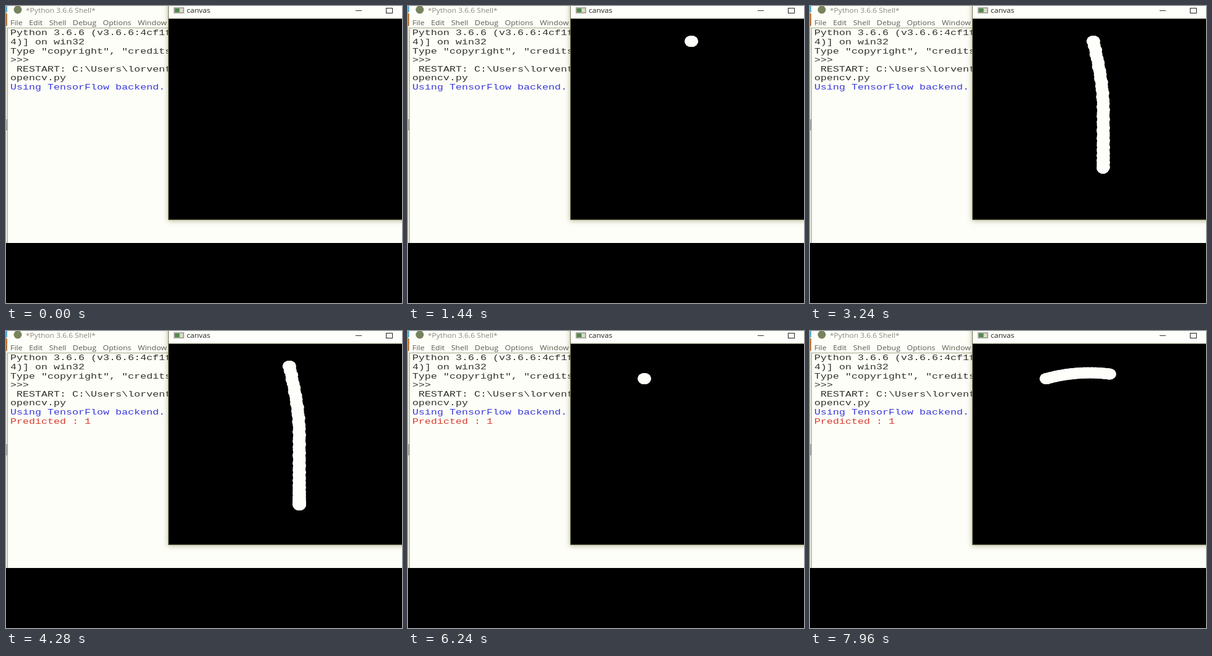
An HTML page with a canvas for the animation above (8000 ms loop, 640 by 480 pixels).

```html
<!DOCTYPE html>
<html lang="en">
<head>
<meta charset="utf-8">
<title>Digit drawing</title>
<style>
html, body { margin: 0; width: 100%; height: 100%; overflow: hidden; background: #000; }
canvas { display: block; }
</style>
</head>
<body>
<canvas id="stage" width="640" height="480"></canvas>
<script>
const ctx = document.getElementById('stage').getContext('2d');
const LOOP = 8000, STEP = 40, PREDICTED_AT = 4040;
const PAPER = '#fefef8';
const MONO = '13.33px "Liberation Mono", monospace';
const UI = '10.4px "Open Sans", sans-serif';
const TITLE = '10px "Open Sans", sans-serif';

// A stroke rests from `show`, moves from `start` to `end`, and vanishes at `clear`.
// `pen` maps progress 0..1 to a position.
const strokes = [
  { show: 1280, start: 1480, end: 3960, clear: 4640, pen(k) {
    const p = 1 - (1 - k) ** 2;
    return [458 + 16 * Math.sin(Math.min(1, 2 * p) * Math.PI / 2), 57 + 224 * p];
  } },
  { show: 6120, start: 6280, end: 7960, clear: LOOP, pen(k) {
    return [382 + 103 * k, 67.5 + 9.5 * (1 - k / 0.68) ** 2];
  } }
];

const menu = ['File', 'Edit', 'Shell', 'Debug', 'Options', 'Window'];
const shell = [
  'Python 3.6.6 (v3.6.6:4cf1f54eb7',
  '4)] on win32',
  'Type "copyright", "credits"',
  '>>>',
  ' RESTART: C:\\Users\\lorvent',
  'opencv.py',
  'Using TensorFlow backend.'
];

function rect(color, x, y, w, h) {
  ctx.fillStyle = color;
  ctx.fillRect(x, y, w, h);
}

// Returns the drawn width.
function text(str, x, y, font, color, aspect = 1.2) {
  ctx.save();
  ctx.translate(x, y);
  ctx.scale(aspect, 1);
  ctx.font = font;
  ctx.fillStyle = color;
  ctx.fillText(str, 0, 0);
  const width = ctx.measureText(str).width * aspect;
  ctx.restore();
  return width;
}

const shellLine = (str, row, color) =>
  text(str, 7, 47.4 + row * 14.6, MONO, color, 1.25);

function drawShell(t) {
  rect(PAPER, 0, 0, 640, 383);
  rect('#e8e8d8', 0, 0, 2, 383);
  rect('#59a9cf', 0, 0, 2, 10);
  rect('#b97836', 0, 12, 2, 20);
  rect('#a9a9a0', 0, 183, 2, 18);
  rect('#a6a688', 2, 35, 1, 348);
  rect('#a6a688', 2, 35, 260, 1);

  ctx.fillStyle = '#77835c';
  ctx.beginPath();
  ctx.arc(19, 6, 6.5, 0, 7);
  ctx.fill();

  text('*Python 3.6.6 Shell*', 32, 11, TITLE, '#8c8c84');
  let x = 7;
  for (const label of menu) x += text(label, x, 31, UI, '#5c5c54') + 10.4;
  shell.forEach((str, row) => shellLine(str, row, row === 6 ? '#3838e0' : '#33332c'));
  if (t >= PREDICTED_AT) shellLine('Predicted : 1', 7, '#d83c2c');
}

function drawWindow() {
  ctx.save();
  ctx.shadowColor = 'rgba(110, 110, 50, 0.5)';
  ctx.shadowBlur = 8;
  ctx.shadowOffsetY = 1;
  rect('#77775c', 262, -10, 400, 356);
  ctx.restore();
  rect('#fefefa', 263, 0, 377, 20);
  rect('#000', 263, 21, 377, 324);

  rect('#a9a99c', 271, 2, 17, 10);
  rect('#4d8a4b', 273, 4, 7, 6);
  rect('#dcdccb', 281, 4, 5, 6);
  text('canvas', 292, 11.3, TITLE, '#222');

  rect('#333', 565, 7, 10, 1);
  ctx.strokeStyle = '#222';
  ctx.lineWidth = 1;
  ctx.strokeRect(614.5, 3.5, 10, 8);
}

// The pen leaves one slightly shaky blob per step.
function drawStroke({ show, start, end, clear, pen }, t) {
  if (t >= clear) return;
  ctx.fillStyle = '#fefefa';
  for (let time = show; time <= Math.min(t, end); time += STEP) {
    const [x, y] = pen(Math.max(0, (time - start) / (end - start)));
    const shake = 0.6 * Math.sin(time);
    ctx.beginPath();
    ctx.ellipse(x + shake, y, 10.4, 9.1, 0, 0, 2 * Math.PI);
    ctx.fill();
  }
}

function frame() {
  const t = performance.now() % LOOP;
  rect('#000', 0, 0, 640, 480);
  drawShell(t);
  drawWindow();
  for (const stroke of strokes) drawStroke(stroke, t);
  requestAnimationFrame(frame);
}
frame();
</script>
</body>
</html>
```
